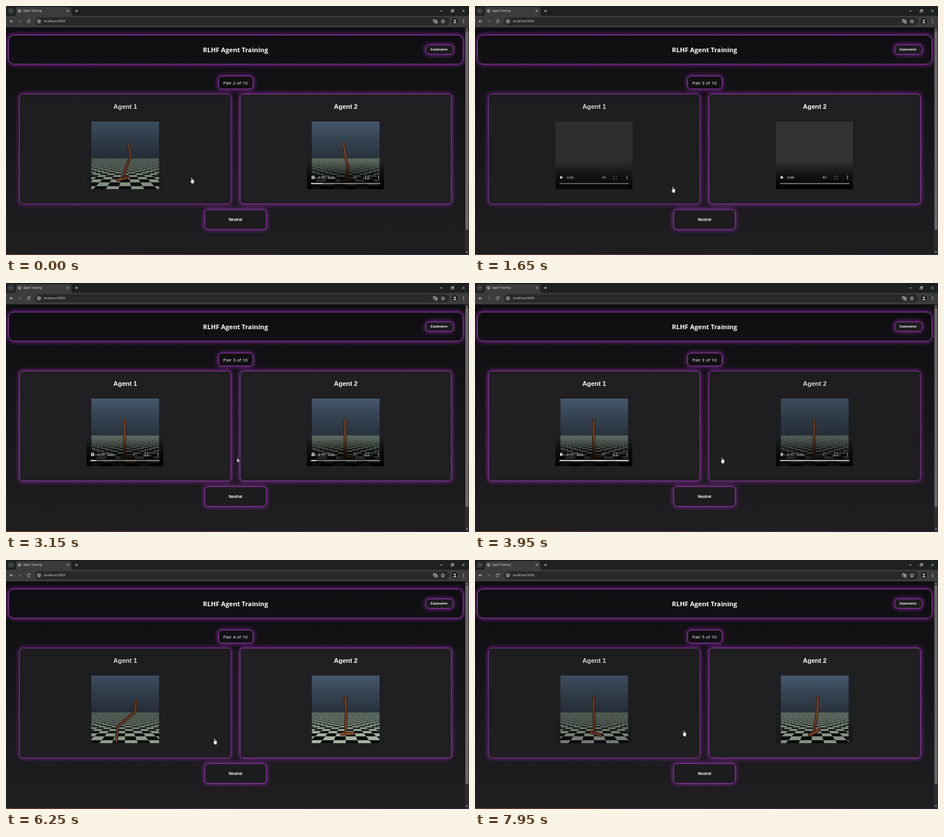
An HTML page with a canvas for the animation above (8 s loop, 800 by 431 pixels).

```html
<!DOCTYPE html>
<html lang="en">
<head>
<meta charset="utf-8">
<title>Agent Training</title>
<style>
  html, body { margin: 0; width: 100%; height: 100%; overflow: hidden; background: #111013; }
  #stage { position: relative; width: 800px; height: 431px; overflow: hidden; color: #fff;
    background: linear-gradient(#0e0e11 37px, #151417 200px, #1e1d20 400px); }
  #stage > svg { position: absolute; left: 0; top: 0; }
  .box { position: absolute; box-sizing: border-box; border: 1px solid #853b98; border-radius: 6px;
    box-shadow: 0 0 7px 1px #84289c; background: #1d1c1f; display: flex; align-items: center; justify-content: center;
    font: bold 6.7px "Liberation Sans", Arial, sans-serif; white-space: nowrap; }
  .header { left: 3.5px; top: 49.5px; width: 786px; height: 51.5px; border-radius: 10px;
    background: linear-gradient(#0e0e11, #121114); font: bold 11.2px "Open Sans", sans-serif; }
  .explain { left: 724.5px; top: 66.5px; width: 48px; height: 17px; font-size: 5.1px; }
  .pair { left: 366.5px; top: 121px; width: 60px; height: 23px; background: #111013; font: 8px "Open Sans", sans-serif; }
  .card { top: 152px; width: 366px; height: 191px; background: #201f22; }
  .card b { position: absolute; top: 13.7px; left: 0; right: 0; text-align: center; font-size: 11.2px; line-height: 14px; }
  .card canvas { position: absolute; left: 115px; top: 47px; width: 133px; height: 117px; }
  .neutral { left: 343px; top: 351.5px; width: 107px; height: 35px; }
</style>
</head>
<body>
<div id="stage">
  <div class="box header">RLHF Agent Training</div>
  <div class="box explain">Explanation</div>
  <div class="box pair" id="pair"></div>
  <div class="box card" style="left:23px"><b>Agent 1</b><canvas></canvas></div>
  <div class="box card" style="left:404px"><b>Agent 2</b><canvas></canvas></div>
  <div class="box neutral">Neutral</div>

  <svg width="800" height="431" fill="none" stroke="#ddd" stroke-width=".8" font-family="'Open Sans', sans-serif">
    <defs>
      <linearGradient id="strip"><stop stop-color="#7a4326"/><stop offset=".3" stop-color="#5d304c"/><stop offset="1" stop-color="#29294c"/></linearGradient>
    </defs>
    <g stroke="none">
      <path fill="#1f2020" d="M0 0H800V18H0z"/>
      <path fill="#3c3c3c" d="M0 17H14Q17 17 17 14V6Q17 2 21 2H109Q113 2 113 6V14Q113 17 116 17H800V37H0z"/>
      <rect x="3" y="3" width="11" height="11" rx="3.5" fill="#343536"/>
      <rect x="50" y="19.5" width="716" height="14" rx="7" fill="#282828"/>
      <circle cx="57" cy="26.5" r="5" fill="#3c3c3c"/>
      <circle cx="775.5" cy="26.5" r="5.5" fill="#222"/>
      <path fill="#2c2c2d" d="M793 37H800V431H793z"/>
      <rect x="794" y="43" width="5" height="345" rx="2.5" fill="#69696a"/>
      <path fill="#aaa" d="M794.7 41.5L796.5 39L798.3 41.5zM794.7 425L796.5 427.5L798.3 425z"/>
      <path fill="url(#strip)" d="M0 429.7H800V431H0z"/>
      <g fill="#e6e6e6">
        <text x="30" y="10.4" font-size="4.75">Agent Training</text>
        <text x="65.5" y="28.3" font-size="5.5">localhost:5000</text>
        <circle cx="775.5" cy="25" r="1.5"/><path d="M772.5 29.5Q775.5 25.5 778.5 29.5z"/>
        <circle cx="790.5" cy="24" r=".65"/><circle cx="790.5" cy="26.5" r=".65"/><circle cx="790.5" cy="29" r=".65"/>
      </g>
    </g>
    <path d="M7 7.7L8.5 9.2L10 7.7M105 6.7L108.5 10.2M108.5 6.7L105 10.2M119.3 8.5H124.3M121.8 6V11"/>
    <circle cx="23.5" cy="8.5" r="2.4"/><path d="M21.5 7.5L24 8.5L23 10.5"/>
    <path d="M12.3 26.5H7M9.4 24L7 26.5L9.4 29"/>
    <path stroke="#777" d="M21.5 26.5H26.8M24.4 24L26.8 26.5L24.4 29"/>
    <path d="M41.3 25A2.5 2.5 0 1 0 41.5 27.4M41.7 23.7V25.4H40"/>
    <circle cx="57" cy="26.5" r="2.4"/><path d="M57 26V28M57 24.9V25.5"/>
    <path d="M738.5 23.5H742V28H738.5zM742 25H745V30H741M739.5 25H741M742.8 28.5L743.6 26.5L744.4 28.5"/>
    <path d="M755 23.3L755.9 25.5L758.2 25.7L756.5 27.2L757 29.5L755 28.3L753 29.5L753.5 27.2L751.8 25.7L754.1 25.5z"/>
    <path d="M750 8.5H754.5M769 7.4H772.4V10.7H769zM770.2 7.2V6.2H773.6V9.5H772.6M788.3 6.5L792.3 10.5M792.3 6.5L788.3 10.5"/>
    <g id="cursor" stroke="#222" stroke-width=".5" fill="#fff">
      <path id="hand" d="M-.8 .6Q0 -.5 .8 .6V3.6L3.4 4.1Q4.3 4.4 4.2 5.4L3.6 8.2V10.2H-.8V9L-2.5 6.6Q-2.6 5.3 -.8 6z"/>
      <path id="arrow" d="M0 0V7L1.6 5.6L2.7 8.2L3.8 7.7L2.7 5.2H4.8z"/>
    </g>
  </svg>
</div>

<script>
const LOOP = 8000, ENDED = 60, LOADING_SHADE = "#333235";
// Level camera seen in floor tiles: its height, its distance to the hopper, the far edge of the floor
const FOCAL = 141, EYE_HEIGHT = 2.65, HOPPER_DEPTH = 9, FLOOR_DEPTH = 69, EYE_LEVEL = 258.5, CENTER = 206;

const $ = id => document.getElementById(id);
const clamp = v => Math.max(0, Math.min(1, v));
const cards = [...document.querySelectorAll(".card")];
const ratio = Math.max(2, devicePixelRatio);
const contexts = cards.map(card => {
  const canvas = card.querySelector("canvas");
  canvas.width = 133 * ratio;
  canvas.height = 117 * ratio;
  const ctx = canvas.getContext("2d");
  ctx.scale(ratio, ratio);
  ctx.translate(-139, -200);
  return ctx;
});

// Head, hip, knee, ankle, heel, toe as x, y pairs
const pose = {
  stand: [205,237, 205,260, 205,280, 205,299, 200,301, 218,301],
  bent:  [212,239, 215,261, 208,279, 203,296, 193,301, 209,297],
  bow:   [202,238, 206,262, 210,280, 208,299, 200,303, 216,300],
  lean:  [220,240, 217,262, 207,280, 200,295, 191,294, 205,302],
  fall:  [225,243, 223,263, 193,288, 191,314, 186,320, 200,320],
  sway:  [205,237, 207,264, 206,282, 206,298, 199,301, 219,300],
  tilt:  [205,237, 205,260, 206,280, 206,297, 200,298, 217,303],
  step:  [211,238, 211,258, 207,282, 205,295, 197,303, 213,294]
};

// Each clip repeats with its period; poses are [ms into the clip, pose]
const pairs = [
  { label: 2, from: -2000, clips: [
    { start: -400, period: 1000, poses: [[0, "stand"], [400, "bent"], [700, "lean"], [950, "fall"]] },
    { start: -150, period: 880, poses: [[0, "stand"], [150, "bow"], [800, "sway"]] }] },
  { label: 3, from: 1600, clips: [
    { start: 2180, period: 900, poses: [[0, "stand"]] },
    { start: 2180, period: 900, poses: [[0, "stand"]] }] },
  { label: 4, from: 4200, clips: [
    { start: 4500, period: 650, poses: [[0, "stand"], [300, "lean"], [450, "fall"]] },
    { start: 4500, period: 940, poses: [[0, "stand"], [810, "sway"]] }] },
  { label: 5, from: 6550, clips: [
    { start: 6900, period: 680, poses: [[0, "stand"], [370, "tilt"], [620, "stand"]] },
    { start: 6900, period: 680, poses: [[0, "stand"], [370, "step"], [620, "bent"]] }] }
];

// [time, x, y] of the pointer tip
const pointer = [[0, 321, 297], [1500, 342, 313], [1750, 342, 313], [2550, 374.5, 304], [3800, 427, 302],
  [4250, 427, 302], [5300, 393, 350], [5500, 393, 350], [5950, 364, 316], [6250, 360.5, 309], [7950, 361, 295]];

function between(keys, t, mix) {
  const next = keys.findIndex(k => k[0] > t);
  if (next < 0) return mix(keys.at(-1), keys.at(-1), 0);
  const a = keys[next - 1], b = keys[next], u = (t - a[0]) / (b[0] - a[0]);
  return mix(a, b, u);
}

function gradient(ctx, y0, y1, ...colors) {
  const g = ctx.createLinearGradient(0, y0, 0, y1);
  colors.forEach((c, i) => g.addColorStop(i / (colors.length - 1), c));
  return g;
}

function drawFloor(ctx, shift) {
  const px = (c, z) => CENTER + (c + shift) * FOCAL / z;
  const py = z => EYE_LEVEL + EYE_HEIGHT * FOCAL / z;
  const edge = py(FLOOR_DEPTH);
  ctx.fillStyle = gradient(ctx, edge, 317, "#3d4942", "#1c241f", "#0d110e", "#0a0c0a");
  ctx.fillRect(147.5, edge, 117, 317 - edge);
  ctx.beginPath();
  for (let z = 6; z < FLOOR_DEPTH; z++) {
    const reach = Math.ceil(z * 0.43 + 3);
    for (let c = -reach; c <= reach; c++) {
      if (!((z + c) & 1)) continue;
      ctx.moveTo(px(c, z), py(z));
      ctx.lineTo(px(c + 1, z), py(z));
      ctx.lineTo(px(c + 1, z + 1), py(z + 1));
      ctx.lineTo(px(c, z + 1), py(z + 1));
    }
  }
  ctx.fillStyle = gradient(ctx, edge, 317, "#74857a", "#93a294", "#a2af9f", "#aab6a5");
  ctx.fill();
}

function drawHopper(ctx, p) {
  const limb = (from, to, width, color) => {
    ctx.beginPath();
    for (let i = from; i <= to; i++) ctx.lineTo(p[2 * i], p[2 * i + 1]);
    ctx.lineWidth = width;
    ctx.strokeStyle = color;
    ctx.stroke();
  };
  ctx.lineCap = ctx.lineJoin = "round";
  limb(4, 5, 6.2, "#402213");
  limb(4, 5, 3.4, "#874c2e");
  limb(0, 3, 5, "#3c1f10");
  limb(0, 3, 2.4, "#7c4526");
}

function drawControls(ctx, alpha, { loading, ended, progress }) {
  ctx.globalAlpha = alpha;
  ctx.fillStyle = gradient(ctx, 268, 314, "#0000", "#0009", "#000e");
  ctx.fillRect(139, 268, 133, 49);
  ctx.globalAlpha = clamp((alpha - 0.3) / 0.7);
  ctx.fillStyle = "#fff";
  if (loading || ended) {
    ctx.beginPath();
    ctx.moveTo(147.3, 293.8);
    ctx.lineTo(152.3, 296.8);
    ctx.lineTo(147.3, 299.8);
    ctx.fill();
  } else {
    ctx.fillRect(147.3, 294, 1.6, 5.6);
    ctx.fillRect(150.2, 294, 1.6, 5.6);
  }
  ctx.font = "5.9px 'Liberation Sans', Arial, sans-serif";
  ctx.fillText(loading ? "0:00" : ended ? "0:01 / 0:01" : "0:00 / 0:01", 159, 298.9);
  for (const y of [294.5, 296.8, 299.1]) ctx.fillRect(262, y - 0.6, 1.3, 1.3);

  ctx.lineWidth = 0.8;
  ctx.strokeStyle = loading ? "#777" : "#fff";
  ctx.stroke(new Path2D("M240 296V294.3H241.7M243.3 294.3H245V296M245 297.6V299.3H243.3M241.7 299.3H240V297.6"));
  ctx.strokeStyle = ctx.fillStyle = loading ? "#777" : "#555";
  ctx.fill(new Path2D("M219.5 295.5H221L223 293.8V299.8L221 298.1H219.5z"));
  ctx.stroke(new Path2D("M224 295.3Q225.4 296.8 224 298.3M225 294Q227.3 296.8 225 299.6"));

  ctx.fillStyle = loading ? "#888" : "#999";
  ctx.fillRect(146, 306.6, 120, 1.6);
  ctx.fillStyle = "#fff";
  ctx.fillRect(146, 306.6, 120 * progress, 1.6);
}

function drawVideo(ctx, clip, t) {
  ctx.globalAlpha = 1;
  ctx.clearRect(139, 200, 133, 117);
  if (t < clip.start) {
    ctx.fillStyle = LOADING_SHADE;
    ctx.fillRect(139, 200, 133, 117);
    drawControls(ctx, 1, { loading: true, progress: 0 });
    return;
  }
  const phase = (t - clip.start) % clip.period;
  const ended = t > clip.start + ENDED && phase > clip.period - ENDED;
  const body = between(clip.poses, phase, (a, b, u) =>
    pose[a[1]].map((v, i) => v + (pose[b[1]][i] - v) * u));
  // The camera follows the body, so the floor moves along with the foot
  const footShift = ((body[8] + body[10]) / 2 - 209) * HOPPER_DEPTH / FOCAL;

  ctx.save();
  ctx.beginPath();
  ctx.rect(147.5, 200, 117, 117);
  ctx.clip();
  ctx.fillStyle = gradient(ctx, 200, 264, "#46586c", "#354352", "#29323d");
  ctx.fillRect(147, 200, 118, 65);
  drawFloor(ctx, footShift);
  drawHopper(ctx, body);
  ctx.restore();

  // The bar still shows the finished run for a moment after a restart
  const progress = ended || phase < 50 ? 1 : phase / clip.period;
  const alpha = ended ? 1 : clamp((420 - phase) / 220);
  if (alpha) drawControls(ctx, alpha, { ended, progress });
}

function draw() {
  const t = performance.now() % LOOP;
  const pair = pairs.findLast(p => t >= p.from);
  $("pair").textContent = `Pair ${pair.label} of 10`;

  const [x, y] = between(pointer, t, (a, b, u) => {
    const s = u * u * (3 - 2 * u);
    return [a[1] + (b[1] - a[1]) * s, a[2] + (b[2] - a[2]) * s];
  });
  const inside = (l, top, w, h) => x >= l && x <= l + w && y >= top && y <= top + h;
  const hovered = [inside(23, 152, 366, 191), inside(404, 152, 366, 191)];
  const hand = hovered[0] || hovered[1] || inside(343, 352, 107, 35);
  $("cursor").setAttribute("transform", `translate(${x} ${y})`);
  $("hand").style.display = hand ? "" : "none";
  $("arrow").style.display = hand ? "none" : "";

  cards.forEach((card, i) => {
    card.style.opacity = hovered[i] ? 0.84 : 1;
    drawVideo(contexts[i], pair.clips[i], t);
  });
  requestAnimationFrame(draw);
}
draw();
</script>
</body>
</html>
```
